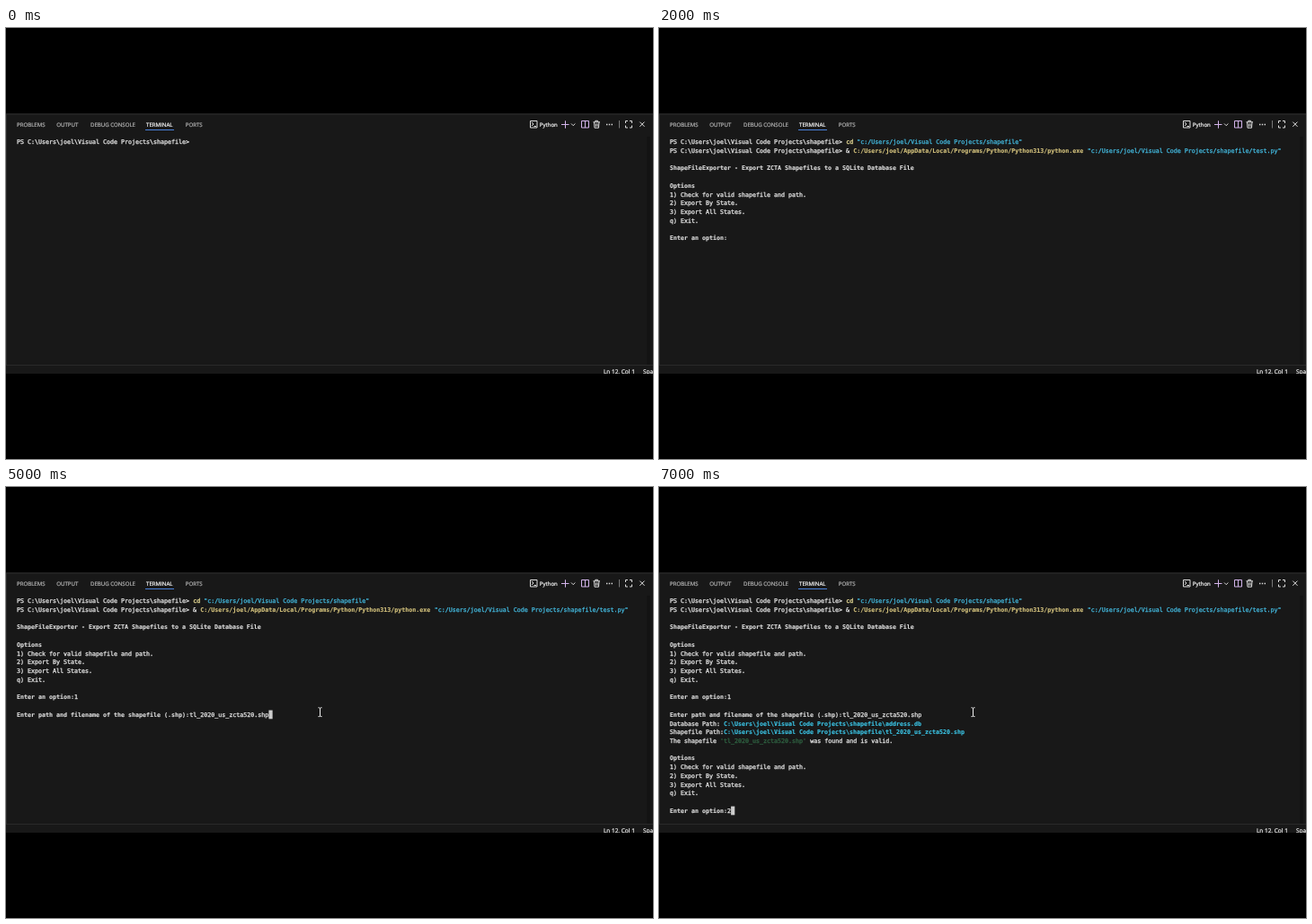
Recreate the animation shown at these times as an HTML page. Size 720 px wide and 480 px high, loop 8 s.

```html
<!DOCTYPE html>
<html lang="en">
<head>
<meta charset="utf-8">
<title>Terminal session</title>
<style>
  html, body { margin: 0; width: 100%; height: 100%; overflow: hidden; background: #000; }
  svg { display: block; text-rendering: geometricPrecision; }
  text { white-space: pre; fill: currentColor; stroke: currentColor; stroke-width: .22; }
  .ui { font: 6.1px "Open Sans", "Noto Sans", sans-serif; color: #b0b0b0; }
  .ui .on { color: #f4f4f4; }
  .ui .status { font-size: 6.5px; color: #eee; }
  .icons { fill: none; stroke: #dedede; stroke-width: 1; }
  .icons .tint { stroke: #d3b4ea; }
  #term { font: 6.655px "DejaVu Sans Mono", monospace; color: #e2e2e2; }
  #term text { stroke-width: .3; }
  #term .bold, #term .exe, #term .path { font-weight: bold; stroke-width: .1; }
  #term .cmd { color: #efe29a; }
  #term .exe { color: #d6c47e; }
  #term .str { color: #42b4d8; }
  #term .path { color: #3cc8ea; }
  #term .file { color: #2f6342; }
</style>
</head>
<body>
<svg width="720" height="480" viewBox="0 0 720 480">
  <defs><clipPath id="panel"><rect y="95" width="720" height="290"/></clipPath></defs>
  <g clip-path="url(#panel)">
    <rect y="95" width="720" height="290" fill="#181818"/>
    <path d="M0 96H720M.5 96V376M0 375.5H720" stroke="#2a2a2a" fill="none"/>
    <rect x="713" y="121" width="4" height="254" fill="#131313"/>

    <g class="ui">
      <text x="12" y="109.8">PROBLEMS</text>
      <text x="56.3" y="109.8">OUTPUT</text>
      <text x="94" y="109.8">DEBUG CONSOLE</text>
      <text x="156.1" y="109.8" class="on">TERMINAL</text>
      <text x="199.8" y="109.8">PORTS</text>
      <text x="593.8" y="109.6" class="on">Python</text>
      <text x="665" y="384.5" class="status">Ln 12, Col 1</text>
      <text x="709" y="384.5" class="status">Spaces: 4</text>
    </g>
    <path d="M155 113.5H187" stroke="#4a80d8"/>

    <g class="icons">
      <path d="M583.5 103.5h7.5v7.5h-7.5zM585 105l2 2-2 2M587.5 109.5h2.5"/>
      <path class="tint" d="M618 107.5h8.5M622.5 103.3v8.4"/>
      <path d="M629 106.5l2.2 2.2 2.2-2.2"/>
      <path class="tint" d="M640.5 103.5h8v7.5h-8zM644.5 103.5v7.5"/>
      <path d="M653.5 104.8h7.5M655.8 104.5v-1.2h2.8v1.2M654.5 105l.5 6.2h4.5l.5-6.2M656.4 106.5v3.2M658.2 106.5v3.2"/>
      <path d="M668 107.5h1.4m1.4 0h1.4m1.4 0h1.4" stroke-width="1.3"/>
      <path d="M682.5 103v8.5" stroke="#777"/>
      <path d="M689.5 106v-2.5h2.4M694 103.5h2.5v2.5M696.5 108.5v2.5h-2.5M691.9 111h-2.4v-2.5"/>
      <path d="M705.3 104.6l5.2 5.2M710.5 104.6l-5.2 5.2"/>
    </g>

    <g id="term"></g>
    <rect id="cursor" width="4.2" height="9.7" fill="#ccc"/>
    <path id="mouse" d="M347.5 245.8h1.4l.6.6.6-.6h1.4M349.5 246.2v9M347.5 255.6h1.4l.6-.6.6.6h1.4" fill="none" stroke="#f0f0f0"/>
  </g>
</svg>
<script>
const LEFT = 12, TOP = 122.1, CHAR = 4.006, LINE = 9.73;
const STEP = 1000, STEPS = 8;
const term = document.getElementById("term");
const cursor = document.getElementById("cursor");
const mouse = document.getElementById("mouse");
const prompt = String.raw`PS C:\Users\joel\Visual Code Projects\shapefile>`;
const folder = String.raw`C:\Users\joel\Visual Code Projects\shapefile` + "\\";
const shp = "tl_2020_us_zcta520.shp";
const spans = [];

// Adds styled pieces, each [text, class], along one row from a given step on.
function print(step, row, col, ...pieces) {
  for (const [text, style = ""] of pieces) {
    const el = document.createElementNS("http://www.w3.org/2000/svg", "text");
    el.textContent = text;
    el.setAttribute("class", style);
    el.setAttribute("x", LEFT + col * CHAR);
    el.setAttribute("y", TOP + row * LINE + 7.2);
    term.append(el);
    spans.push({ el, step });
    col += text.length;
  }
}

function printMenu(step, row) {
  print(step, row, 0, ["Options", "bold"]);
  ["1) Check for valid shapefile and path.", "2) Export By State.", "3) Export All States.", "q) Exit."]
    .forEach((item, i) => print(step, row + 1 + i, 0, [item]));
  print(step, row + 6, 0, ["Enter an option:", "bold"]);
}

print(0, 0, 0, [prompt]);
print(1, 0, 49, ["cd ", "cmd"], ['"c:/Users/joel/Visual Code Projects/shapefile"', "str"]);
print(1, 1, 0, [prompt + " & "],
  ["C:/Users/joel/AppData/Local/Programs/Python/Python313/python.exe ", "exe"],
  ['"c:/Users/joel/Visual Code Projects/shapefile/test.py"', "str"]);
print(2, 3, 0, ["ShapeFileExporter - Export ZCTA Shapefiles to a SQLite Database File", "bold"]);
printMenu(2, 5);
print(3, 11, 16, ["1"]);
print(4, 13, 0, ["Enter path and filename of the shapefile (.shp):", "bold"]);
print(5, 13, 48, [shp]);
print(7, 14, 0, ["Database Path: "], [folder + "address.db", "path"]);
print(7, 15, 0, ["Shapefile Path:"], [folder + shp, "path"]);
print(7, 16, 0, ["The shapefile "], [`'${shp}'`, "file"], [" was found and is valid."]);
printMenu(7, 18);
print(7, 24, 16, ["2"]);

// Cursor cell [row, column] for each step that shows it.
const cells = { 3: [11, 17], 4: [13, 48], 5: [13, 70], 6: [14, 0], 7: [24, 17] };

function show(el, visible) {
  el.setAttribute("visibility", visible ? "visible" : "hidden");
}

function draw(now) {
  const current = Math.floor(now / STEP) % STEPS;
  for (const { el, step } of spans) show(el, current >= step);
  show(mouse, current >= 3);
  const cell = cells[current];
  show(cursor, cell);
  if (cell) {
    cursor.setAttribute("x", LEFT + cell[1] * CHAR);
    cursor.setAttribute("y", TOP + cell[0] * LINE);
  }
  requestAnimationFrame(draw);
}
draw(performance.now());
</script>
</body>
</html>
```
